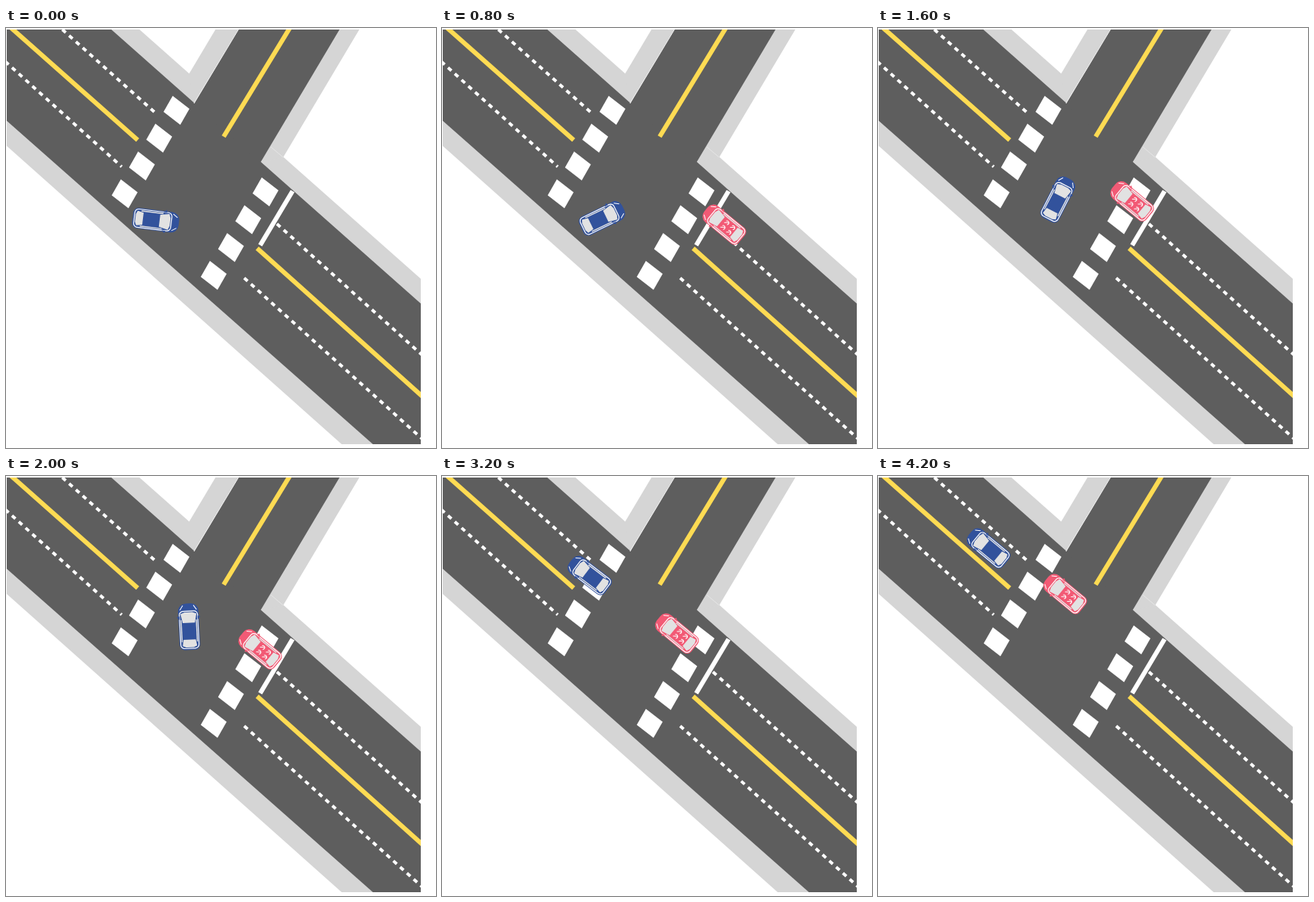
An HTML page with a canvas that plays this animation: 565x551 px, repeating every 4.4 s.

```html
<!DOCTYPE html>
<html lang="en">
<head>
<meta charset="utf-8">
<title>Junction</title>
<style>
  html, body { margin: 0; width: 100%; height: 100%; overflow: hidden; background: #fff; }
  canvas { display: block; }
</style>
</head>
<body>
<canvas id="stage" width="565" height="551"></canvas>
<script>
const ctx = document.getElementById('stage').getContext('2d');
const STEP = 200, STEPS = 22;
const ROAD = '#5e5e5e', WALK = '#d5d5d5', YELLOW = '#fedb53', WHITE = '#fff', GLASS = '#e2e2e2';
const BLUE = '#32529c', RED = '#f25a75';
const LANE = -140.5;

// The turn as x, y, heading (degrees), one key every three steps
const TURN_GAP = 3;
const TURN = [
  [197.5, 253, 7], [206.5, 251, -20], [223, 244, -38], [241.5, 213, -77],
  [232.5, 168, -123], [206, 140.5, -138], [168, 110.5, -152]
];

// Smooth curve through evenly spaced keys
function spline(keys, t) {
  const last = keys.length - 1;
  const i = Math.min(Math.floor(t), last - 1), u = t - i;
  const slope = (j, n) => {
    const a = Math.max(j - 1, 0), b = Math.min(j + 1, last);
    return (keys[b][n] - keys[a][n]) / (b - a);
  };
  return keys[i].map((p, n) => {
    const q = keys[i + 1][n], d = q - p;
    const m = slope(i, n), k = slope(i + 1, n);
    return p + u * (m + u * (3 * d - 2 * m - k + u * (m + k - 2 * d)));
  });
}

function alongLane(x, y, distance) {
  const a = LANE * Math.PI / 180;
  return [x + distance * Math.cos(a), y + distance * Math.sin(a), LANE];
}

const bluePose = step => step < 19
  ? spline(TURN, step / TURN_GAP)
  : alongLane(165.5, 111.5, 13 * (step - 19));

// Brakes evenly to a halt at step 6, waits, then drives on at constant speed
function redPose(step) {
  const braking = -12 * Math.max(0, 6 - step) ** 2;
  const leaving = step > 15 ? 16.3 * (step - 14) : 0;
  return alongLane(334, 227.5, braking + leaving);
}

function poly(color, ...pts) {
  ctx.fillStyle = color;
  ctx.beginPath();
  for (let i = 0; i < pts.length; i += 2) ctx.lineTo(pts[i], pts[i + 1]);
  ctx.fill();
}

function line(color, width, x1, y1, x2, y2, dash = []) {
  ctx.strokeStyle = color;
  ctx.lineWidth = width;
  ctx.setLineDash(dash);
  ctx.beginPath();
  ctx.moveTo(x1, y1);
  ctx.lineTo(x2, y2);
  ctx.stroke();
  ctx.setLineDash([]);
}

function roundBox(x, y, w, h, radius) {
  ctx.beginPath();
  ctx.roundRect(x, y, w, h, radius);
}

function drawRoads() {
  ctx.save();
  ctx.beginPath();
  ctx.rect(1, 2, 544, 544);
  ctx.clip();
  ctx.translate(-1, -1);
  poly(WALK, 0, 0, 173, 0, 550, 333.5, 550, 643, 0, 154);
  poly(WALK, 278, 0, 467, 0, 365, 171, 335, 177, 248, 100, 241, 62);
  poly(ROAD, 0, 0, 136, 0, 550, 366, 550, 606, 0, 121);
  poly(ROAD, 308, 0, 441, 0, 335, 178, 247, 102);
  line('#f4f4f4', 1, 307, 2, 248, 100);
  line('#e6e6e6', 1, 349, 157, 365, 170.5);

  line(YELLOW, 6, 0, -6, 174, 148);
  line(YELLOW, 6, 331, 290, 550, 486);
  line(YELLOW, 6, 374.5, 0, 287, 143.5);
  const dash = [6, 6];
  line(WHITE, 4, 75, 3, 197, 112, dash);
  line(WHITE, 4, 0, 45, 153, 183, dash);
  line(WHITE, 4, 357, 258, 550, 432, dash);
  line(WHITE, 4, 314, 329, 550, 542, dash);
  line(WHITE, 6, 377.5, 215, 335, 286);

  for (const [x0, y0] of [[225, 109], [342, 216]])
    for (let i = 0; i < 4; i++) {
      const x = x0 - 22.7 * i, y = y0 + 36.5 * i;
      poly(WHITE, x - 5, y - 19, x + 17, y - 2, x + 5, y + 19, x - 17, y + 2);
    }
  ctx.restore();
}

function drawCar([x, y, heading], color, patterned) {
  ctx.save();
  ctx.translate(x - 0.7, y - 0.7);
  ctx.rotate(heading * Math.PI / 180);
  ctx.fillStyle = color;
  roundBox(-30.5, -13.5, 61, 27, [7, 10, 10, 7]);
  ctx.fill();

  ctx.strokeStyle = WHITE;
  ctx.lineWidth = 1.2;
  roundBox(-28.5, -12, 49, 24, 5);
  ctx.stroke();
  poly(GLASS, 5, -8, 17, -10.5, 19, -5, 19, 5, 17, 10.5, 5, 8);
  poly(GLASS, -17, -8, -25, -9.5, -27, -5, -27, 5, -25, 9.5, -17, 8);
  for (const side of [-1, 1]) {
    poly(color, 9, side * 12, 13, side * 15.5, 14, side * 12);
    line(GLASS, 1.4, -20, side * 10, 9, side * 10);
    line(WHITE, 1, 22, side * 11, 28, side * 7);
  }

  if (patterned) {
    ctx.lineWidth = 1;
    for (const px of [-12, -2])
      for (const py of [-4, 4]) {
        ctx.beginPath();
        ctx.arc(px, py, 2.5, 0.5, 4);
        ctx.stroke();
        line(WHITE, 1, px - 2, py + 2, px + 3, py - 2);
      }
  }
  ctx.restore();
}

function frame(now) {
  const step = Math.floor(now / STEP) % STEPS;
  ctx.fillStyle = WHITE;
  ctx.fillRect(0, 0, 565, 551);
  drawRoads();
  if (step > 1) drawCar(redPose(step), RED, true);
  drawCar(bluePose(step), BLUE, false);
  requestAnimationFrame(frame);
}
requestAnimationFrame(frame);
</script>
</body>
</html>
```
